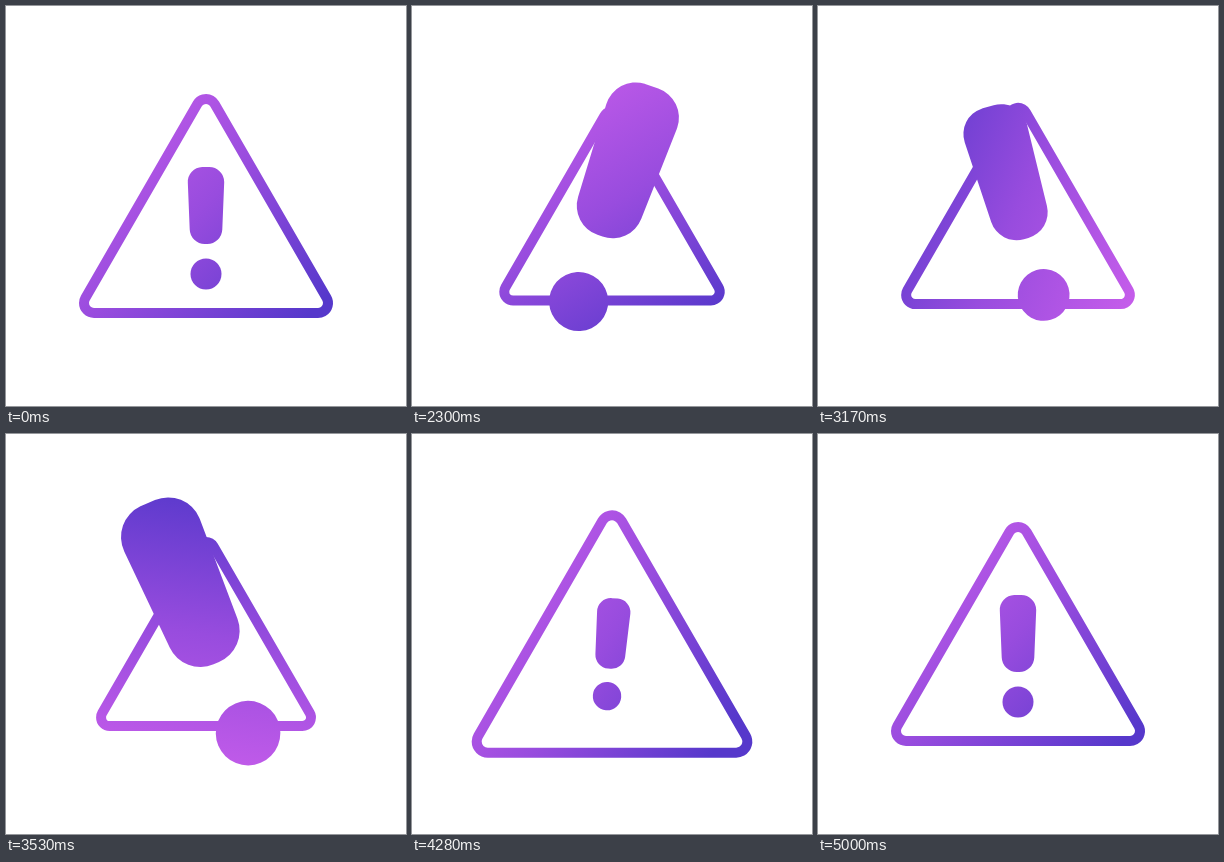
These frames come from a looping animation (400x400 px, 5.06 s). An HTML page with a canvas:

```html
<!DOCTYPE html>
<html>
<head>
<meta charset="utf-8">
<style>
html, body { margin: 0; height: 100%; overflow: hidden; background: #fff; }
canvas { display: block; }
</style>
</head>
<body>
<canvas id="stage" width="400" height="400"></canvas>
<script>
const ctx = document.getElementById('stage').getContext('2d');
const LOOP = 5060, START = 2030, STEP = 30, RAD = Math.PI / 180;

const progress = (t, from, to) => Math.min(1, Math.max(0, (t - from) / (to - from)));

// Rises smoothly from 0 to 1.
function ease(t, from, to) {
  const u = progress(t, from, to);
  return u * u * (3 - 2 * u);
}

// Rises from 0 to 1 and falls back.
const bump = (t, from, to) => Math.sin(Math.PI * progress(t, from, to)) ** 2;

// The mark grows and leans right, swings to the left, then overshoots and settles.
function pose(t) {
  const grow = ease(t, 2010, 2400);
  const swing = ease(t, 2430, 3410);
  const release = ease(t, 3630, 4200);
  const settle = ease(t, 4200, 4700);
  return {
    scale: 1 + 1.26 * grow - 0.99 * bump(t, 2430, 3410) - 1.35 * release + 0.09 * settle,
    turn: (23 * (grow - 2 * swing + release) + 4.9 * (release - settle)) * RAD,
    size: 1 - 0.14 * grow + 0.083 * bump(t, 2480, 3480)
      + 0.263 * ease(t, 3770, 4190) - 0.123 * ease(t, 4190, 4620),
    light: (45 + 360 * ease(t, 2000, 4550)) * RAD
  };
}

function shade(angle) {
  const x = Math.cos(angle), y = Math.sin(angle);
  const g = ctx.createLinearGradient(-140 * x, -140 * y, 150 * x, 150 * y);
  g.addColorStop(0, '#c45cea');
  g.addColorStop(0.48, '#984cde');
  g.addColorStop(1, '#5638cb');
  return g;
}

// Builds a path in a turned, shifted and scaled space but paints it in stage space.
function shape(build, scale, turn = 0, dx = 0, dy = 0) {
  ctx.save();
  ctx.rotate(turn);
  ctx.translate(dx, dy);
  ctx.scale(scale, scale);
  ctx.beginPath();
  build();
  ctx.restore();
}

function triangle() {
  ctx.arc(0, -97, 10, 210 * RAD, 330 * RAD);
  ctx.arc(112, 97, 10, -30 * RAD, 90 * RAD);
  ctx.arc(-112, 97, 10, 90 * RAD, 210 * RAD);
  ctx.closePath();
}

function bar() {
  ctx.moveTo(-3.2, -24);
  ctx.lineTo(3.2, -24);
  ctx.lineTo(1.3, 23);
  ctx.lineTo(-1.3, 23);
  ctx.closePath();
}

function dot() {
  ctx.arc(0, 68, 15.5, 0, 2 * Math.PI);
}

function draw(now) {
  let t = now % LOOP;
  t = t < START ? 0 : Math.min(5000, START + Math.floor((t - START) / STEP) * STEP);
  const { scale, turn, size, light } = pose(t);
  const growth = Math.max(0, scale - 1);

  ctx.setTransform(1, 0, 0, 1, 0, 0);
  ctx.clearRect(0, 0, 400, 400);
  ctx.translate(200, 200);
  ctx.lineJoin = 'round';
  ctx.fillStyle = ctx.strokeStyle = shade(light);

  shape(triangle, size);
  ctx.lineWidth = 10;
  ctx.stroke();

  shape(bar, scale, turn, -1.5 * growth, -43.7 * growth);
  ctx.lineWidth = 30 * scale;
  ctx.fill();
  ctx.stroke();

  shape(dot, scale - 0.14 * growth, turn, 0, -27 * growth);
  ctx.fill();
}

const begin = performance.now();
function tick() {
  draw(performance.now() - begin);
  requestAnimationFrame(tick);
}
tick();
</script>
</body>
</html>
```
